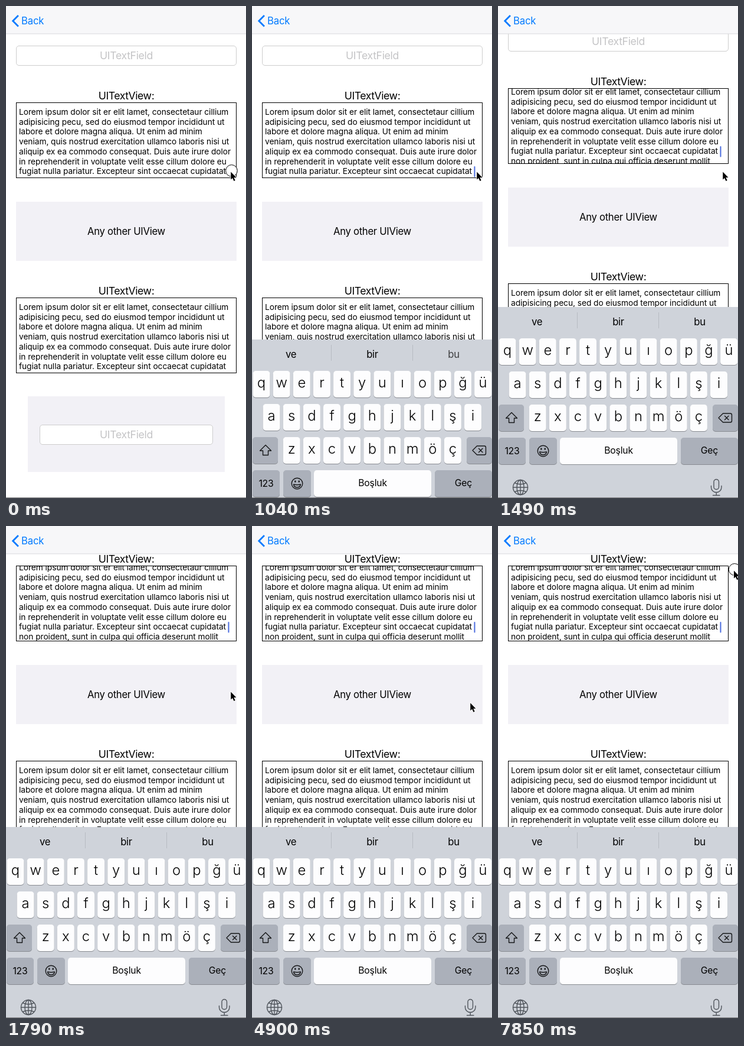
Recreate the animation shown at these times as an HTML page. Size 407 px wide and 832 px high, loop 8 s.

```html
<!DOCTYPE html>
<html lang="en">
<head>
<meta charset="utf-8">
<title>Keyboard and text views</title>
<style>
  html, body { margin: 0; width: 100%; height: 100%; overflow: hidden; background: #fff; }
  svg { display: block; }
  text { font-family: Inter, "Open Sans", sans-serif; font-optical-sizing: none; }
  .mid { text-anchor: middle; }
  .label { font-size: 17.7px; letter-spacing: -.45px; }
  .hint { font-size: 17.7px; letter-spacing: -.35px; fill: #c4c4c6; }
  .view { font-size: 16.7px; letter-spacing: -.3px; }
  .body { font-size: 13.76px; letter-spacing: -.052px; }
  .key { font-size: 23.8px; font-weight: 300; }
  .small { font-size: 15.7px; letter-spacing: -.15px; }
  .icon { fill: none; stroke: #17181a; stroke-width: 1.4; stroke-linejoin: round; stroke-linecap: round; }
  .util { fill: none; stroke: #50555c; stroke-width: 1.4; stroke-linecap: round; }
</style>
</head>
<body>
<svg id="stage" width="407" height="832" viewBox="0 0 407 832" xmlns="http://www.w3.org/2000/svg">
  <rect width="407" height="832" fill="#fff"/>
  <g id="page"></g>
  <g id="nav">
    <rect width="407" height="47" fill="#f7f7f9"/>
    <rect y="46.5" width="407" height="1" fill="#d9d9dd"/>
    <path d="M20.9 16 L11.7 25.3 L20.9 34.6" fill="none" stroke="#007aff" stroke-width="2.8"/>
    <text x="26" y="31" class="view" fill="#007aff" style="letter-spacing:-.15px">Back</text>
  </g>
  <g id="keyboard"></g>
  <rect y="831" width="407" height="1" fill="#7b7b7d"/>
  <g id="pointer">
    <circle id="tap" cx="2.5" cy="-.5" r="9.9" fill="#fff" fill-opacity=".85" stroke="#000"/>
    <path d="M1.3 1.6 V14.6 L4.2 11.9 L6.5 17.1 L8.7 16.1 L6.4 11 H10.5 Z" stroke="#fff" stroke-width="1.6" paint-order="stroke"/>
  </g>
</svg>
<script>
const LOOP = 8000, STEP = 148.1;
const $ = id => document.getElementById(id);

const lines = [
  "Lorem ipsum dolor sit er elit lamet, consectetaur cillium",
  "adipisicing pecu, sed do eiusmod tempor incididunt ut",
  "labore et dolore magna aliqua. Ut enim ad minim",
  "veniam, quis nostrud exercitation ullamco laboris nisi ut",
  "aliquip ex ea commodo consequat. Duis aute irure dolor",
  "in reprehenderit in voluptate velit esse cillum dolore eu",
  "fugiat nulla pariatur. Excepteur sint occaecat cupidatat",
  "non proident, sunt in culpa qui officia deserunt mollit"
];

const rect = (x, y, w, h, fill, r = 0) =>
  `<rect x="${x}" y="${y}" width="${w}" height="${h}" rx="${r}" fill="${fill}"/>`;
const text = (x, y, cls, s, id = "") =>
  `<text x="${x}" y="${y}" class="${cls}" ${id && `id="${id}"`}>${s}</text>`;

function field(x, y, w) {
  return `<rect x="${x + .5}" y="${y + .5}" width="${w - 1}" height="33" rx="4.5" fill="#fff" stroke="#cdcdcd"/>`
    + text(204, y + 23, "hint mid", "UITextField");
}

function textView(y, id, extra = "") {
  const rows = lines.map((s, i) => text(5, 21 + i * 16.72, "body", s)).join("");
  return text(204, y - 5, "label mid", "UITextView:")
    + `<svg x="17" y="${y}" width="374" height="128" overflow="hidden"><g id="${id}">${rows}${extra}</g></svg>`
    + `<rect x="17.5" y="${y + .5}" width="373" height="127" fill="none" stroke="#000"/>`;
}

const PANEL = "#f2f1f6";
$("page").innerHTML =
  field(17, 67, 374)
  + textView(163, "first", `<rect id="caret" x="359.5" y="108" width="2" height="18.5" rx="1" fill="#4b6cde"/>`)
  + rect(17, 331, 374, 100, PANEL)
  + text(204, 387, "view mid", "Any other UIView")
  + textView(493, "second")
  + rect(37, 660, 334, 128, PANEL)
  + field(57, 708, 294);

const WHITE = "#fdfdfe", GREY = "#abb0ba", PITCH = 34.15;
const key = (x, y, w, fill) =>
  rect(x, y + 1, w, 45, "#898c92", 5) + rect(x, y, w, 45, fill, 5);
const keyRow = (chars, y) => [...chars].map((c, i) => {
  const cx = 203.8 + (i - (chars.length - 1) / 2) * PITCH;
  return key(cx - 14.5, y, 29, WHITE) + text(cx, y + 28, "key mid", c);
}).join("");

$("keyboard").innerHTML =
  rect(0, 509, 407, 330, "#cfd3da")
  + rect(134, 518, 1, 27, "#b7bbc3") + rect(272, 518, 1, 27, "#b7bbc3")
  + text(66, 540, "view mid", "ve") + text(204, 540, "view mid", "bir")
  + text(342, 540, "view mid", "bu", "lastWord")
  + keyRow("qwertyuıopğü", 562)
  + keyRow("asdfghjklşi", 618)
  + keyRow("zxcvbnmöç", 674)
  + key(1, 674, 43, GREY) + key(364, 674, 43, GREY)
  + key(1, 730, 46, GREY) + key(53, 730, 47, GREY)
  + key(105, 730, 199, WHITE) + key(310, 730, 97, GREY)
  + text(24, 757.5, "small mid", "123")
  + text(204.5, 756.5, "small mid", "Boşluk")
  + text(358.5, 756.5, "small mid", "Geç")
  + `<path class="icon" d="M23 687.5 L32.5 697 H27.5 V704.5 H18.5 V697 H13.5 Z"/>
     <path class="icon" d="M381.5 689 H394 Q396.5 689 396.5 691.5 V701.5 Q396.5 704 394 704 H381.5 L374 696.5 Z
       M384.5 693.2 L391 699.8 M391 693.2 L384.5 699.8"/>
     <circle class="icon" cx="76.5" cy="752.5" r="9.3"/>
     <path class="icon" d="M70.5 754 Q76.5 755.5 82.5 754 Q81.5 759 76.5 759 Q71.5 759 70.5 754 Z"/>
     <ellipse cx="73.3" cy="749" rx="1.3" ry="1.8" fill="#17181a"/>
     <ellipse cx="79.7" cy="749" rx="1.3" ry="1.8" fill="#17181a"/>
     <g class="util">
       <circle cx="38" cy="814" r="12.5"/>
       <ellipse cx="38" cy="814" rx="6" ry="12.5"/>
       <path d="M38 801.5 V826.5 M25.5 814 H50.5 M28.5 806.5 Q38 811 47.5 806.5 M28.5 821.5 Q38 817 47.5 821.5"/>
       <rect x="366" y="800.5" width="8.5" height="17" rx="4.25"/>
       <path d="M361.5 811.5 V814 A8.75 8.5 0 0 0 379 814 V811.5 M370.25 822.5 V827.5 M364.5 827.5 H376"/>
     </g>`;

// Pointer path: step, x, y
const path = [
  [0, 380, 279], [16, 380, 279], [17, 383, 250], [18, 387, 222], [19, 389, 208],
  [21, 389, 208], [22, 396, 200], [23, 391, 205], [24, 384.5, 208], [27, 384.5, 208],
  [29, 385, 225], [32, 374, 280], [35, 359, 333], [36, 357, 354], [37, 356, 361],
  [42, 356, 361], [45, 379, 205], [47, 395, 95], [48, 398.7, 74], [54, 398.7, 74]
];
const fades = [16, 23, 30, 36, 43, 49];

const clamp = v => Math.min(1, Math.max(0, v));
const ease = v => (v = clamp(v), v < .5 ? 4 * v ** 3 : 1 - 4 * (1 - v) ** 3);

function pointerAt(k) {
  const i = Math.max(1, path.findIndex(p => p[0] >= k));
  const [k0, x0, y0] = path[i - 1], [k1, x1, y1] = path[i];
  const f = (k - k0) / (k1 - k0);
  return [x0 + (x1 - x0) * f, y0 + (y1 - y0) * f];
}

function caretAlpha(k) {
  if (k < 5) return 0;
  const start = fades.find(f => k >= f && k < f + 3);
  return start === undefined ? 1 : k === start ? .5 : 0;
}

// Critically damped slide of the keyboard
function keyboardDrop(ms) {
  const w = Math.max(0, ms - 867.5) / 1000 * 18.26;
  return 323 * Math.exp(-w) * (1 + w);
}

const move = (id, x, y) => $(id).setAttribute("transform", `translate(${x} ${y})`);

function draw(t) {
  const k = Math.min(53, Math.floor(t / STEP));
  const ms = k * 149;
  move("page", 0, -Math.round(96 * ease((ms - 1371) / 300)));
  move("first", 0, -13 * ease((ms - 1305) / 300));
  move("keyboard", 0, Math.round(keyboardDrop(ms)));
  move("pointer", ...pointerAt(k));
  $("caret").setAttribute("opacity", caretAlpha(k));
  $("lastWord").setAttribute("opacity", k < 8 ? .7 : 1);
  $("tap").setAttribute("opacity", [0, 41, 53].includes(k) ? 1 : 0);
}

const begin = performance.now();
function tick() {
  draw((performance.now() - begin) % LOOP);
  requestAnimationFrame(tick);
}
tick();
</script>
</body>
</html>
```
